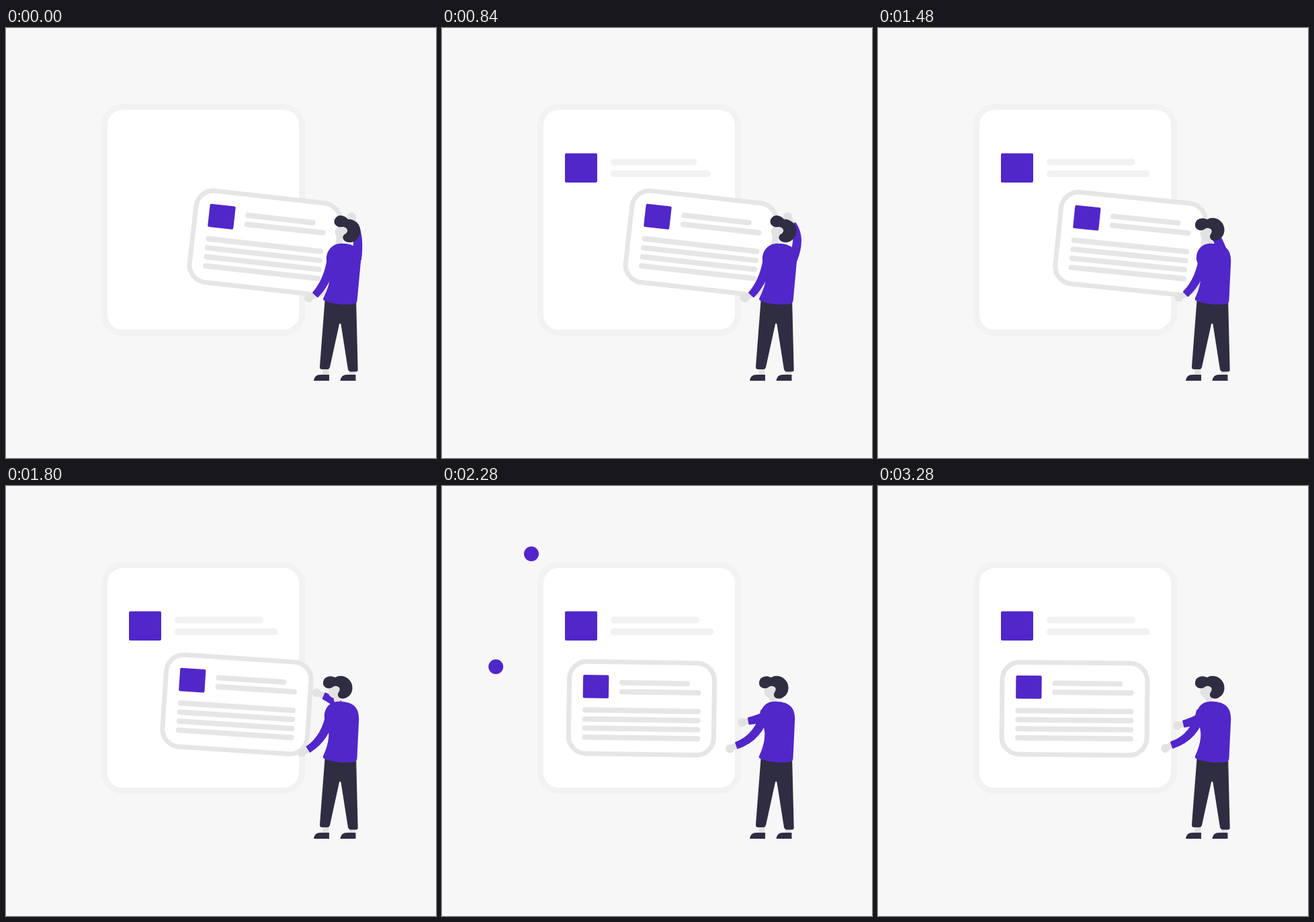
Write an HTML page that moves like this. It is 640x640 px and loops after 3.88 s.

```html
<!DOCTYPE html>
<html lang="en">
<head>
<meta charset="utf-8">
<title>Placing a card</title>
<style>
html, body { margin: 0; width: 100%; height: 100%; overflow: hidden; background: #f7f7f7; }
svg { display: block; width: 100vw; height: 100vh; }
.blue { fill: #5127c9; }
.dark { fill: #2f2d41; }
.skin { fill: #e2e2e2; }
.limb { fill: none; stroke: #e2e2e2; stroke-width: 9; }
.sleeve { fill: #5127c9; stroke: #5127c9; stroke-width: 2; stroke-linejoin: round; }
.line { fill: none; stroke: #e6e6e6; stroke-width: 8; stroke-linecap: round; }
</style>
</head>
<body>
<svg viewBox="0 0 640 640">
  <g class="blue"><circle id="dotTop"/><circle id="dotLeft"/><circle id="dotRight"/></g>

  <rect x="146.5" y="117.5" width="294" height="336" rx="27" fill="#fff" stroke="#f2f2f2" stroke-width="9"/>
  <rect id="square" class="blue" x="-24" y="-21.75" width="48" height="43.5" rx="2"/>
  <g id="rows" fill="#f2f2f2">
    <rect y="194.5" width="132" height="10" rx="5"/>
    <rect y="212" width="153.5" height="10" rx="5"/>
  </g>

  <path id="backWrist" class="limb"/>
  <circle id="backHand" class="skin" r="6.5"/>

  <g id="card">
    <rect x="-108" y="-68.5" width="216" height="137" rx="26" fill="#fff" stroke="#e6e6e6" stroke-width="7"/>
    <rect class="blue" x="-87.5" y="-48.7" width="38.3" height="34.5" rx="2"/>
    <path class="line" d="M-29.5-37.7H67.5M-29.5-24.3H84M-84 3.5H84M-84 17H84M-84 30.5H84M-84 44H84"/>
  </g>

  <path id="backArm" class="sleeve"/>
  <path id="neck" class="limb"/>
  <g id="head">
    <circle class="skin" cx="-9" cy="6" r="10"/>
    <path class="dark" d="M-8.5-15C-4-18 2-17.5 6-16C20-10 20 8 10 14C4 18-4 17-4.5 11C-5 7-1 6-2 1C-4-3-9-3-12-1C-18 4-27 0-26.5-7C-26-16-17-19-8.5-15Z"/>
  </g>

  <path class="limb" d="M476 505V518M515 508V518"/>
  <g class="dark">
    <path d="M475 400L467 504Q467 508 470 508H479Q481 508 482 505L496 441Q497 438 498.500 441L509 508Q510 511 512 511.500H521Q524 511.500 523.700 508L521 400Z"/>
    <path id="shoe" d="M458 525Q459 516 468 516H481V525Z"/>
    <use href="#shoe" x="39.5"/>
  </g>
  <path id="torso" class="blue" d="M487 322C497 319 512 321 519 328C524 333 526 341 525 352L522.500 405Q522.500 409 519 410.500C505 413 485 411 474 406Q471 405 472 402C480 385 482 370 479 360L474 345C473 336 477 326 487 322Z"/>

  <path id="frontWrist" class="limb"/>
  <circle id="frontHand" class="skin" r="6.5"/>
  <path id="frontArm" class="sleeve"/>
</svg>
<script>
const LOOP = 3880;
const $ = id => document.getElementById(id);
const set = (id, attrs) => {
  for (const k in attrs) $(id).setAttribute(k, attrs[k]);
};
const mix = (a, b, p) => a + (b - a) * p;
const ease = (t, from, to) => {
  const u = Math.min(1, Math.max(0, (t - from) / (to - from)));
  return u * u * (3 - 2 * u);
};

function dot(id, t, x, y, show, hide) {
  const r = 11 * (ease(t, show, show + 280) - ease(t, hide, hide + 220));
  set(id, { cx: x, cy: y, r: Math.max(0, r) });
}

// a point moved sideways from the line a to b
function beside(p, a, b, d) {
  const len = Math.hypot(b.x - a.x, b.y - a.y);
  return `${p.x - (b.y - a.y) / len * d} ${p.y + (b.x - a.x) / len * d}`;
}

// a tapered sleeve bent at the elbow, then wrist and hand
function drawArm(name, shoulder, elbow, cuff, hand) {
  const top = d => beside(shoulder, shoulder, elbow, d);
  const bend = d => beside(elbow, shoulder, cuff, d);
  const end = d => beside(cuff, elbow, cuff, d);
  set(name + "Arm", {
    d: `M${top(6)}Q${bend(6)} ${end(4.5)}L${end(-4.5)}Q${bend(-6)} ${top(-6)}Z`
  });
  set(name + "Wrist", { d: `M${cuff.x} ${cuff.y}L${hand.x} ${hand.y}` });
  set(name + "Hand", { cx: hand.x, cy: hand.y });
}

function drawBackArm(t, move) {
  const lift = ease(t, 600, 860) - ease(t, 860, 1300);
  const shoulder = { x: mix(522, 482, move ** 0.75), y: 344 - 14 * Math.sin(Math.PI * move) };
  const hand = { x: mix(514.5, 445.5, move ** 0.35), y: mix(281, 356.5, move ** 1.3) };
  const elbow = { x: (shoulder.x + hand.x) / 2 + 8 + 9 * lift, y: (shoulder.y + hand.y) / 2 };
  const reach = mix(14, 10, move) / Math.hypot(elbow.x - hand.x, elbow.y - hand.y);
  const cuff = { x: mix(hand.x, elbow.x, reach), y: mix(hand.y, elbow.y, reach) };
  drawArm("back", shoulder, elbow, cuff, hand);
}

function drawFrontArm(move) {
  const cuff = { x: mix(460.5, 437.5, move), y: mix(397, 385.5, move) };
  drawArm("front",
    { x: mix(486, 481, move), y: 335 },
    { x: mix(482, 472, move), y: 374 },
    cuff,
    { x: cuff.x - 10, y: cuff.y + 5 });
}

function draw(t) {
  set("square", { transform: `translate(207 208.250) scale(${ease(t, 0, 400)})` });
  set("rows", { transform: `translate(251 0) scale(${ease(t, 320, 900)} 1)` });

  const move = ease(t, 1240, 2440);
  set("card", {
    transform: `translate(${mix(385.4, 292.5, move)} ${mix(319.6, 331.5, move)}) rotate(${mix(6.4, 0.55, move)})`
  });

  const turn = ease(t, 1060, 1480), lean = 0.045 * (1 - ease(t, 1160, 1480));
  set("head", {
    transform: `translate(${mix(510.5, 498.5, turn)} ${mix(302, 300, turn)}) rotate(${25 * (1 - turn)})`
  });
  set("neck", { d: `M${mix(497, 490, turn)} 307L${mix(496, 494, turn)} 324` });
  set("torso", { transform: `matrix(1 0 ${-lean} 1 ${lean * 410} 0)` });

  drawBackArm(t, move);
  drawFrontArm(move);

  dot("dotTop", t, 133, 101, 1960, 2520);
  dot("dotLeft", t, mix(85.4, 66, ease(t, 1960, 2900)), 269, 1960, 3000);
  dot("dotRight", t, mix(520, 550, ease(t, 2560, 3080)), 220, 2500, 3040);
}

function tick() {
  draw(performance.now() % LOOP);
  requestAnimationFrame(tick);
}
draw(0);
tick();
</script>
</body>
</html>
```
